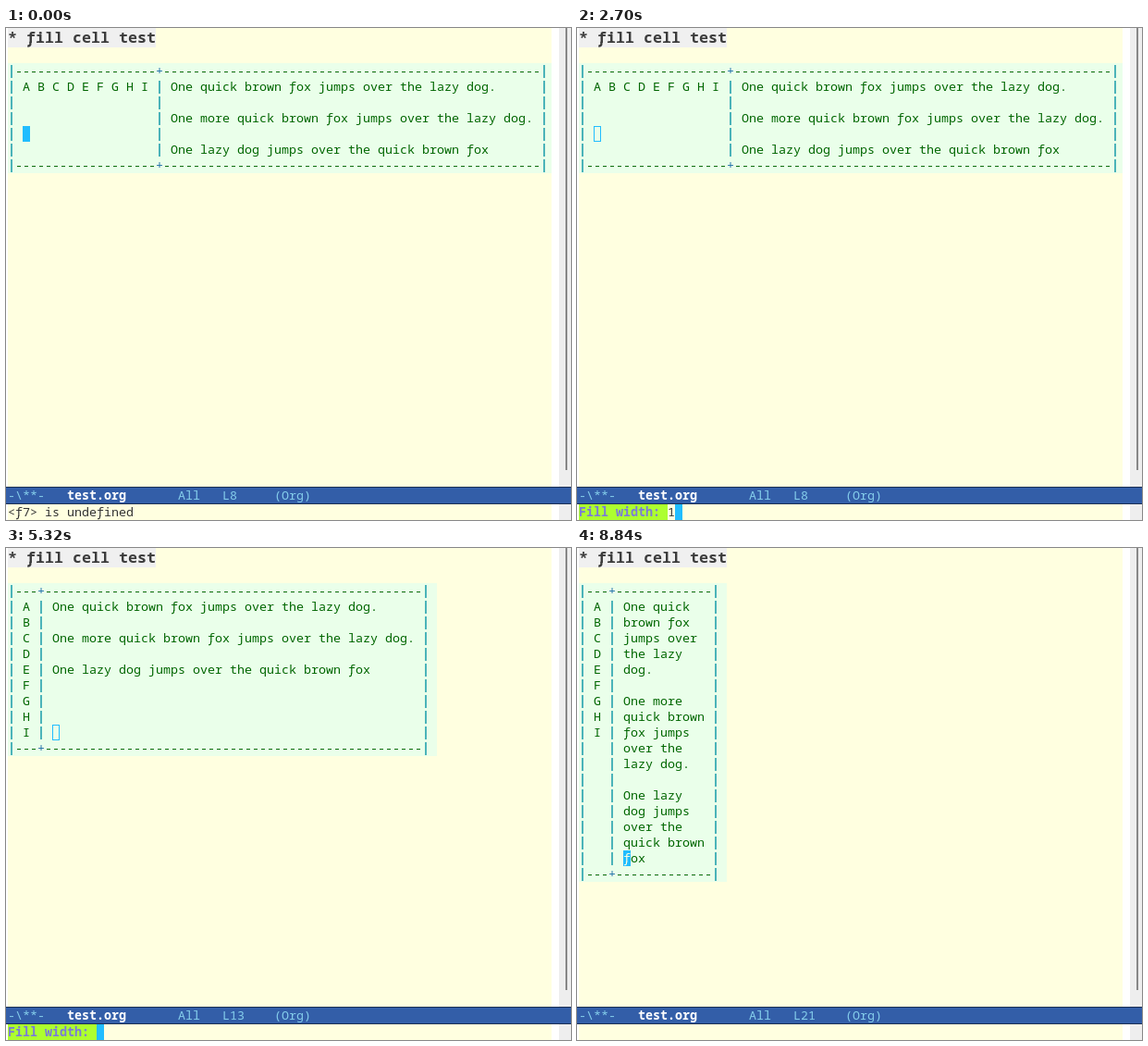
Write an HTML page with a canvas that moves like this. It is 611 px wide and 532 px high and loops after 9300 ms.

```html
<!DOCTYPE html>
<html lang="en">
<head>
<meta charset="utf-8">
<title>Fill cell test</title>
<style>
  html, body { margin: 0; width: 100%; height: 100%; overflow: hidden; background: #ffffe0; }
  canvas { display: block; }
</style>
</head>
<body>
<canvas id="stage" width="611" height="532"></canvas>
<script>
const ctx = document.getElementById('stage').getContext('2d');
const WIDTH = 611, HEIGHT = 532, LOOP = 9300;
const LEFT = 2, CELL = 8, LINE = 17, TABLE_TOP = 38, MODE_HEIGHT = 19;
const PAGE = '#ffffe0', INK = '#333333', GREEN = '#006600', CURSOR = '#21bdff';

const LETTERS = ['A B C D E F G H I'];
const SENTENCES = [
  'One quick brown fox jumps over the lazy dog.',
  'One more quick brown fox jumps over the lazy dog.',
  'One lazy dog jumps over the quick brown fox'
];
const COMMANDS = [
  'org-table-hline-cell-fill-cell',
  'upcase-region'.padEnd(31) + '(C-x C-u)',
  'view-lossage'.padEnd(31) + '(C-h l)',
  'org-table-hline-cell-edit-cell',
  'cd', '5x5', 'arp'
];

// Fill each paragraph to the given width, with a blank line between paragraphs.
function fill(paragraphs, width) {
  const lines = [];
  paragraphs.forEach((paragraph, i) => {
    if (i) lines.push('');
    let line = '';
    for (const word of paragraph.split(' ')) {
      if (line && line.length + 1 + word.length > width) {
        lines.push(line);
        line = word;
      } else {
        line += (line && ' ') + word;
      }
    }
    lines.push(line);
  });
  return lines;
}

function makeTable(leftWidth, rightWidth) {
  const left = fill(LETTERS, leftWidth), right = fill(SENTENCES, rightWidth);
  const rule = `|${'-'.repeat(leftWidth + 2)}+${'-'.repeat(rightWidth + 2)}|`;
  const rows = Array.from({ length: Math.max(left.length, right.length) }, (_, i) =>
    `| ${(left[i] || '').padEnd(leftWidth)} | ${(right[i] || '').padEnd(rightWidth)} |`);
  return [rule, ...rows, rule];
}

const WIDE = makeTable(17, 49), SPLIT = makeTable(1, 49), NARROW = makeTable(1, 11);

// Each step changes part of the editor state.
const ON = { on: true }, OFF = { on: false };
const META_X = { echo: '', prompt: 'M-x ', on: true };
const PICK = { prompt: '1/5212 M-x ', list: true, on: true };
const ASK = { prompt: 'Fill width: ', list: false, on: true };
const DONE = { prompt: '', input: '', on: true };
const STEPS = [
  [0, { table: WIDE, row: 4, col: 2, on: true, echo: '<f7> is undefined', prompt: '', input: '', list: false }],
  [430, OFF], [990, ON],
  [1110, META_X], [1300, PICK], [1770, OFF],
  [2170, ASK], [2700, { input: '1' }],
  [3040, { ...DONE, table: SPLIT, row: 9 }],
  [3570, OFF], [3630, { col: 6, on: true }], [4190, OFF],
  [4380, META_X], [4570, PICK], [5040, OFF],
  [5320, ASK], [5790, OFF],
  [6260, { input: '1', on: true }], [6380, { input: '12' }],
  [6780, { ...DONE, table: NARROW, row: 17 }],
  [7370, OFF], [7840, ON], [8370, OFF], [8840, ON]
];

const stateAt = time => Object.assign({}, ...STEPS.filter(s => s[0] <= time).map(s => s[1]));

function rect(x, y, w, h, color) {
  ctx.fillStyle = color;
  ctx.fillRect(x, y, w, h);
}

// Monospaced text; the letter f gets a hooked tail below the baseline.
function put(text, x, baseline, color, bold = false, advance = CELL) {
  ctx.font = `${bold ? 700 : 400} ${advance / 0.6}px "Noto Sans Mono", "DejaVu Sans Mono", monospace`;
  [...text].forEach((char, i) => {
    const cx = x + i * advance;
    ctx.fillStyle = color;
    ctx.fillText(char, cx, baseline);
    if (char === 'f') {
      const u = advance / 8;
      ctx.strokeStyle = color;
      ctx.lineWidth = (bold ? 1.8 : 1.1) * u;
      ctx.beginPath();
      ctx.moveTo(cx + 3.5 * u, baseline - u);
      ctx.lineTo(cx + 3.5 * u, baseline + u);
      ctx.quadraticCurveTo(cx + 3.5 * u, baseline + 2.8 * u, cx + u, baseline + 2.8 * u);
      ctx.stroke();
    }
  });
}

function drawTable(table) {
  const width = Math.min((table[0].length + 1) * CELL, 588);
  rect(LEFT, TABLE_TOP, width, table.length * LINE, '#eaffea');
  table.forEach((line, row) => [...line].forEach((char, col) => {
    const color = char === '|' ? '#159aa8' : char === '+' ? '#1f6fa8' : GREEN;
    put(char, LEFT + col * CELL, TABLE_TOP + row * LINE + 13, color, char === '|');
  }));
}

function drawPoint({ table, row, col, on, prompt }) {
  const x = LEFT + col * CELL, y = TABLE_TOP + row * LINE;
  if (prompt) {
    ctx.strokeStyle = CURSOR;
    ctx.lineWidth = 1;
    ctx.strokeRect(x + 0.5, y + 0.5, CELL - 1, LINE - 1);
  } else if (on) {
    rect(x, y, CELL, LINE, CURSOR);
    put(table[row][col], x, y + 13, PAGE);
  }
}

function drawModeLine(top, lineNumber) {
  rect(0, top, WIDTH, MODE_HEIGHT, '#1a2f54');
  rect(0, top + 1, WIDTH, MODE_HEIGHT - 2, '#335ea8');
  const label = (text, col, color = '#85ceeb', bold = false) =>
    put(text, LEFT + col * CELL, top + 14, color, bold);
  label('-\\**-', 0);
  label('test.org', 8, '#ffffff', true);
  label('All', 23);
  label('L' + lineNumber, 29);
  label('(Org)', 36);
}

function drawMinibuffer(top, { echo, prompt, input, list, on }) {
  if (!prompt) return put(echo, LEFT, top + 13, INK);
  const inputX = LEFT + prompt.length * CELL;
  rect(LEFT, top, inputX - LEFT, LINE, '#adff2f');
  put(prompt, LEFT, top + 13, '#7b7bd8', true);
  put(input, inputX, top + 13, INK);
  if (on) rect(inputX + input.length * CELL, top, CELL, LINE, CURSOR);
  if (!list) return;
  rect(LEFT, top + LINE, COMMANDS[0].length * CELL, LINE, '#e5ebf5');
  COMMANDS.forEach((command, i) => put(command, LEFT, top + (i + 1) * LINE + 13, INK));
}

function draw(state) {
  const miniTop = HEIGHT - LINE * (state.list ? COMMANDS.length + 1 : 1);
  const modeTop = miniTop - MODE_HEIGHT;

  rect(0, 0, WIDTH, HEIGHT, PAGE);
  rect(0, 0, LEFT, HEIGHT, '#ffffff');
  rect(590, 0, 8, HEIGHT, '#ffffff');
  rect(598, 0, 13, HEIGHT, '#eeeeee');
  rect(605, 0, 2, modeTop - 18, '#878787');
  if (state.list) rect(605, miniTop + 18, 2, 101, '#878787');

  rect(LEFT, 0, 160, 21, '#f0f0f0');
  put('* fill cell test', LEFT, 16, '#3c3c3c', true, 10);
  drawTable(state.table);
  drawPoint(state);
  drawModeLine(modeTop, state.row + 4);
  drawMinibuffer(miniTop, state);
}

const start = performance.now();
function frame() {
  draw(stateAt((performance.now() - start) % LOOP));
  requestAnimationFrame(frame);
}
frame();
</script>
</body>
</html>
```
